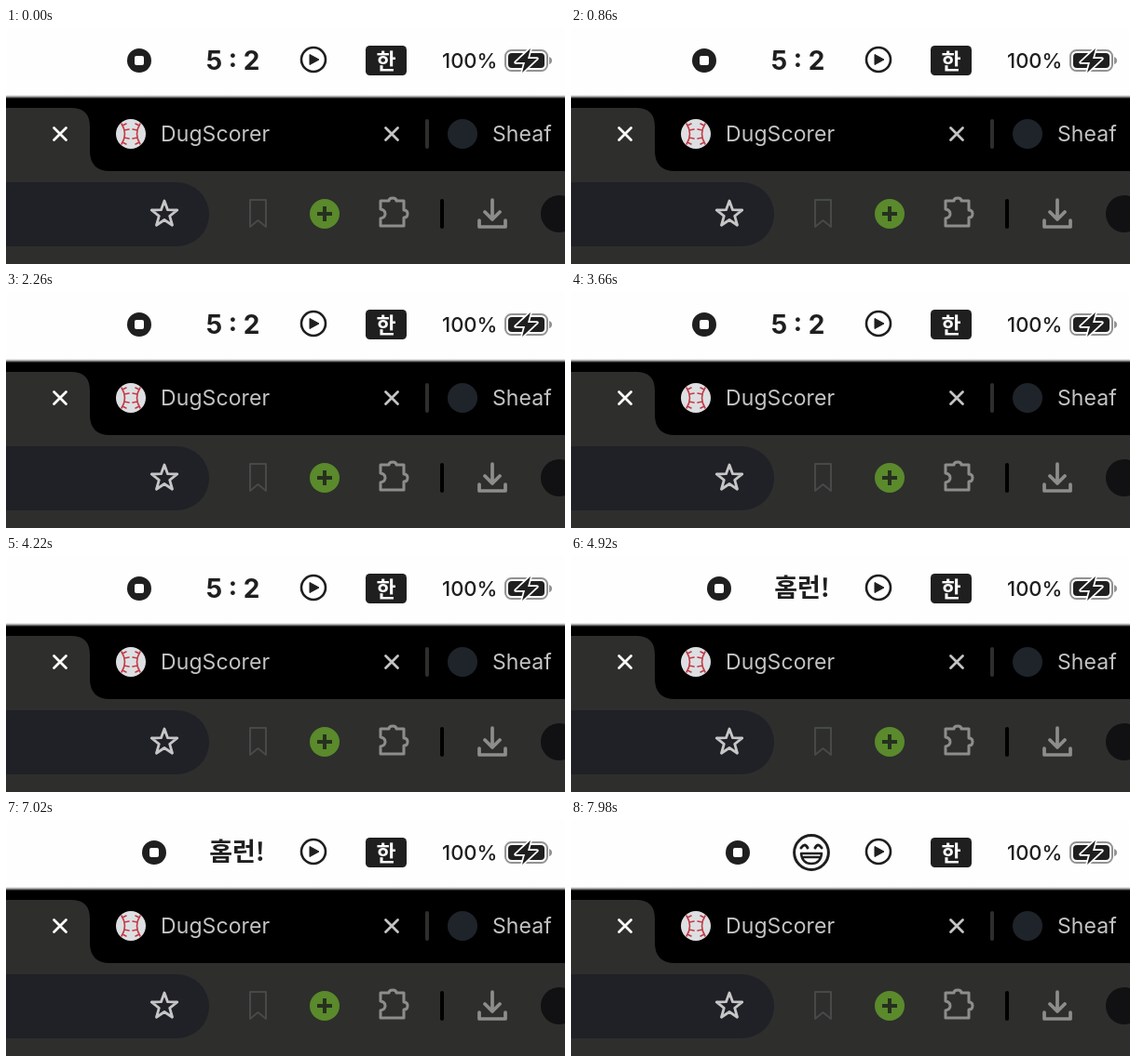
Recreate the animation shown at these times as an HTML page. Size 600x254 px, loop 8 s.

```html
<!DOCTYPE html>
<html lang="ko">
<head>
<meta charset="utf-8">
<title>Menu bar score</title>
<style>
  html, body { margin: 0; width: 100%; height: 100%; overflow: hidden; background: #000; }
  svg { display: block; width: 100vw; height: 100vh; }
  text { font-family: Inter, Roboto, sans-serif; }
  .ko { font-family: "Noto Sans CJK KR", "Noto Sans CJK", "Noto Sans CJK JP", sans-serif; font-weight: 700; }
  .tab { font-size: 23px; fill: #c4c4c5; letter-spacing: .1px; }
  .line { fill: none; stroke-linecap: round; stroke-linejoin: round; }
</style>
</head>
<body>
<svg viewBox="0 0 600 254">
  <defs>
    <linearGradient id="edge" x1="0" y1="0" x2="0" y2="1">
      <stop offset="0" stop-color="#fefefe"/>
      <stop offset=".4" stop-color="#b0b0b0"/>
      <stop offset="1" stop-color="#000"/>
    </linearGradient>
    <path id="cross" class="line" d="M-6.5-6.5 6.5 6.5M6.5-6.5-6.5 6.5" stroke-width="2.8"/>
    <path id="seam" class="line" d="M124 103Q131 114 124 125M125 105l4-2M127 110l5-1M127 118l5 1M125 123l4 2" stroke="#c23a44" stroke-width="1.600"/>
  </defs>

  <!-- Browser tabs -->
  <rect width="600" height="254" fill="#000"/>
  <path d="M0 86H70Q90 86 90 106V132Q90 154 112 154H600V254H0Z" fill="#2e2e2d"/>
  <use href="#cross" x="58" y="114" stroke="#fafafa"/>
  <circle cx="134" cy="114" r="16" fill="#dddfe2"/>
  <use href="#seam"/>
  <use href="#seam" transform="matrix(-1 0 0 1 268 0)"/>
  <text class="tab" x="166" y="122">DugScorer</text>
  <use href="#cross" x="414" y="114" stroke="#c4c4c5"/>
  <rect x="450" y="98" width="4" height="32" rx="2" fill="#2e2e2d"/>
  <circle cx="490" cy="114" r="16" fill="#1f242b"/>
  <text class="tab" x="522" y="122">Sheaf</text>

  <!-- Toolbar -->
  <rect x="-60" y="166" width="278" height="69" rx="34.5" fill="#1f2126"/>
  <path id="star" class="line" stroke="#c6c6c7" stroke-width="2.8"/>
  <path class="line" d="M262 185H279V214L270.5 207 262 214Z" stroke="#464a48" stroke-width="2"/>
  <circle cx="342" cy="200" r="16" fill="#5a8a2b"/>
  <path d="M342 192V208M334 200H350" stroke="#26301f" stroke-width="4"/>
  <path class="line" d="M402 186H411Q411 183 415 183T419 186H427V196Q431 196 431 200T427 204V213H402V205Q407 204 407 200T402 195Z" stroke="#8d8d8c" stroke-width="3"/>
  <rect x="466" y="184" width="4" height="32" rx="2" fill="#000"/>
  <path class="line" d="M522 185V205M514 198L522 206 530 198M508 207V214H536V207" stroke="#8d8d8c" stroke-width="3.700"/>
  <circle cx="594" cy="200" r="20" fill="#111113"/>

  <!-- Menu bar -->
  <rect width="600" height="73" fill="#fefefe"/>
  <rect y="72" width="600" height="4" fill="url(#edge)"/>
  <g fill="#1f1f20">
    <g id="stop">
      <circle cy="35" r="13"/>
      <rect x="-5" y="30" width="10" height="10" rx="2" fill="#fefefe"/>
    </g>
    <text class="state" x="243.500" y="44.500" text-anchor="middle" font-size="28" font-weight="700" xml:space="preserve">5 : 2</text>
    <text class="state ko" x="248" y="44" text-anchor="middle" font-size="27">홈런!</text>
    <g class="state line" stroke="#1f1f20" stroke-width="3">
      <circle cx="258" cy="35" r="18.400"/>
      <path d="M247 30Q251 24 254 30M262 30Q265 24 269 30"/>
      <path d="M247 36H269Q268 47 258 47T247 36ZM250 40H266" stroke-width="2.500"/>
    </g>
    <circle cx="330" cy="34" r="13" fill="none" stroke="#1f1f20" stroke-width="2.600"/>
    <path d="M326 28.500V39.500L336 34Z" stroke="#1f1f20" stroke-linejoin="round"/>
    <rect x="386" y="19" width="44" height="32" rx="4.500"/>
    <text class="ko" x="408" y="43.500" text-anchor="middle" font-size="23" fill="#fefefe">한</text>
    <text x="468" y="43" font-size="22" font-weight="500">100%</text>
    <rect x="536" y="24" width="45" height="22" rx="6.500" fill="none" stroke="#929292" stroke-width="2"/>
    <path d="M583 31Q586 32 586 35T583 39Z" fill="#929292"/>
    <rect x="539" y="27" width="39" height="16" rx="4"/>
    <path d="M563 22L547 37H557L554 48 570 33H560Z" stroke="#fefefe" stroke-width="3.500" stroke-linejoin="round" paint-order="stroke"/>
  </g>
</svg>
<script>
  const LOOP = 8000, HOME_RUN_AT = 4480, SMILE_AT = 7280;
  const SCORE = 0, HOME_RUN = 1, SMILE = 2;
  const stopX = [143, 159, 179];
  const states = document.querySelectorAll('.state');
  const stop = document.getElementById('stop');

  const starPoints = Array.from({ length: 10 }, (_, i) => {
    const angle = i * Math.PI / 5, radius = i % 2 ? 6 : 14.5;
    return `${170 + radius * Math.sin(angle)} ${200.5 - radius * Math.cos(angle)}`;
  });
  document.getElementById('star').setAttribute('d', `M${starPoints.join('L')}Z`);

  function stateAt(time) {
    if (time < HOME_RUN_AT) return SCORE;
    return time < SMILE_AT ? HOME_RUN : SMILE;
  }

  // The recording icon sits left of the status item and follows its width.
  function draw(now) {
    const current = stateAt(now % LOOP);
    states.forEach((el, i) => el.setAttribute('visibility', i === current ? 'visible' : 'hidden'));
    stop.setAttribute('transform', `translate(${stopX[current]})`);
    requestAnimationFrame(draw);
  }
  draw(performance.now());
</script>
</body>
</html>
```
